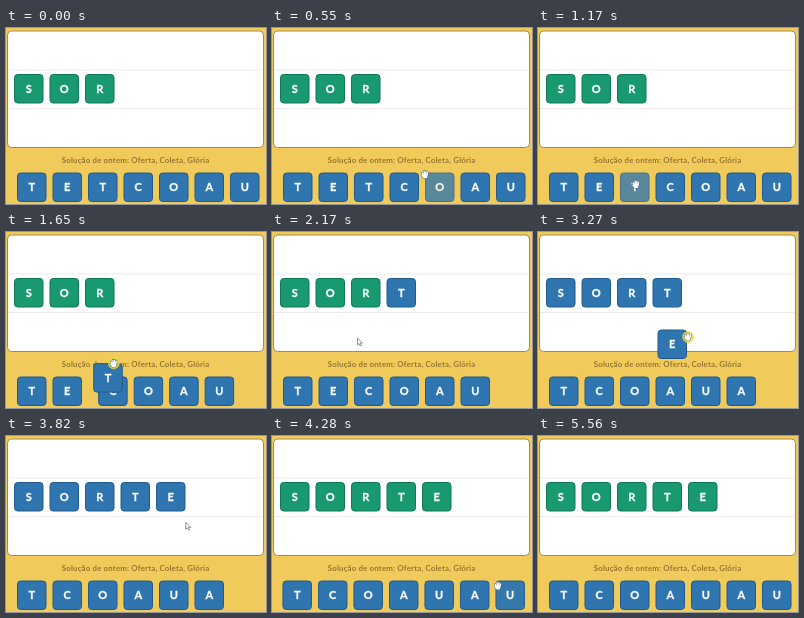
Write an HTML page that moves like this. It is 260 by 176 pixels and loops after 5760 ms.

```html
<!DOCTYPE html>
<html lang="pt">
<head>
<meta charset="utf-8">
<title>Jogo de letras</title>
<style>
  html, body { margin: 0; width: 100%; height: 100%; overflow: hidden; background: #f0cb5c; }
  svg { display: block; width: 100%; height: 100%; }
  text { font-family: Lato, "Open Sans", sans-serif; font-weight: 700; text-anchor: middle; }
  .letter { font-size: 11px; fill: #fff; stroke: #fff; stroke-width: .3; }
  .caption { font-size: 7.8px; letter-spacing: .2px; fill: #96752f; }
</style>
</head>
<body>
<svg id="stage" viewBox="0 0 260 176">
  <rect width="260" height="176" fill="#f0cb5c"/>
  <rect x="1.5" y="3" width="256" height="116.5" rx="4" fill="#fff" stroke="#a48a48"/>
  <path d="M2 42H257M2 80.5H257" stroke="#ececec"/>
  <text class="caption" x="129.6" y="135">Solução de ontem: Oferta, Coleta, Glória</text>
  <g id="tiles"></g>
  <g id="cursor">
    <circle id="press" r="5.5" fill="#f2e136" fill-opacity=".8" stroke="#e3cf2c" stroke-width=".6"/>
    <g id="hand" fill="none" stroke-linecap="round" stroke-linejoin="round">
      <path id="handEdge" stroke="#31506a" stroke-width="2.1"/>
      <path id="handFill" stroke="#fff" stroke-width="1.4"/>
    </g>
    <path id="arrow" d="M0 0V7L1.6 5.5L2.7 8L3.9 7.4L2.8 5.1H5Z" fill="#fff" stroke="#686868" stroke-width=".7" stroke-linejoin="round"/>
  </g>
</svg>
<script>
const LOOP = 5760, PITCH = 35.5, SIZE = 29.5;
const ROW = { x: 8, y: 46 }, RACK = { x: 11, y: 144.5 };
const BLUE = [47, 117, 175], BLUE_EDGE = [33, 91, 141];
const GREEN = [24, 153, 112], GREEN_EDGE = [14, 119, 84];

// Bursts of movement as [start, end, steps]; the picture rests between them.
const bursts = [
  [0, 0, 1], [200, 760, 9], [830, 1170, 6], [1320, 1320, 1], [1500, 2060, 8],
  [2120, 2120, 1], [2170, 2460, 5], [2730, 2730, 1], [3060, 3620, 9],
  [3690, 4200, 8], [4280, 4770, 8], [5560, 5560, 1]
];

// Pointer path as [time, x, y].
const path = [
  [200, 226, 177], [270, 212, 170], [480, 168, 152], [690, 123, 136], [760, 117, 133],
  [830, 115, 135], [960, 105, 147], [1170, 98, 156.5], [1430, 98, 156.5],
  [1660, 113, 118], [1860, 127, 74], [1980, 130, 61], [2060, 123, 68],
  [2120, 104, 88], [2170, 85.5, 106], [2320, 73, 143], [2390, 70, 156], [2460, 69, 161],
  [3000, 69, 161], [3060, 88, 150], [3130, 115, 137], [3200, 142, 114],
  [3270, 150, 105], [3400, 162, 92], [3620, 173, 78], [3690, 174, 79],
  [3980, 197, 108], [4200, 215, 134], [4280, 226, 150], [4490, 231, 165],
  [4600, 234, 175], [4770, 236, 177]
];

const drags = {
  T: { press: 1320, start: 1500, drop: 2020, from: 2, to: 3 },
  E: { press: 2730, start: 3060, drop: 3660, from: 1, to: 4 }
};

const NS = "http://www.w3.org/2000/svg";
const $ = id => document.getElementById(id);
const clamp = v => Math.max(0, Math.min(1, v));
const ramp = (t, a, b) => clamp((t - a) / (b - a));
const ease = v => v * v * (3 - 2 * v);
const mix = (a, b, k) => `rgb(${a.map((v, i) => Math.round(v + (b[i] - v) * k))})`;
const show = (el, on) => el.setAttribute("display", on ? "inline" : "none");
const move = (el, x, y) => el.setAttribute("transform", `translate(${x} ${y})`);

function make(tag, attrs, parent) {
  const el = document.createElementNS(NS, tag);
  for (const key in attrs) el.setAttribute(key, attrs[key]);
  return parent.appendChild(el);
}

function makeTile(letter) {
  const g = make("g", {}, $("tiles"));
  const box = make("rect", { x: .5, y: .5, width: SIZE - 1, height: SIZE - 1, rx: 3.2 }, g);
  make("text", { class: "letter", x: SIZE / 2, y: 18.9 }, g).textContent = letter;
  return { g, box };
}

const word = [..."SOR"].map(makeTile);
const rack = [
  ["T", 0], ["C", 3], ["O", 4], ["A", 5], ["U", 6], ["A", 7, 2300], ["U", 8, 4190]
].map(([letter, slot, born = 0]) => ({ ...makeTile(letter), slot, born }));
const moving = Object.keys(drags).map(letter => ({ ...makeTile(letter), ...drags[letter] }));

const handPath = "M-2.6-1.6L-1.6 1M-.9-3.3L-.6 1M.9-3.3L.7 1M2.6-2L1.9 1.2M-3.1 .7L-1.2 2.8H1.3L1.9 .8H-1.6L-.6 2H.9";
$("handEdge").setAttribute("d", handPath);
$("handFill").setAttribute("d", handPath);

function step(t) {
  const [start, end, n] = bursts.filter(b => b[0] <= t + .01).pop();
  if (n === 1) return start;
  const gap = (end - start) / (n - 1);
  return start + gap * Math.min(n - 1, Math.floor((t - start) / gap + .001));
}

function pointer(t) {
  const i = path.findIndex(p => p[0] > t);
  if (i === 0) return path[0].slice(1);
  if (i < 0) return path[path.length - 1].slice(1);
  const a = path[i - 1], b = path[i], k = ramp(t, a[0], b[0]);
  return [a[1] + (b[1] - a[1]) * k, a[2] + (b[2] - a[2]) * k];
}

// Share of the last moments the pointer spent on a tile.
function hover(t, x, y) {
  let hits = 0;
  for (let i = 0; i < 6; i++) {
    const [px, py] = pointer(t - i * 25);
    if (px >= x && px <= x + SIZE && py >= y && py <= y + SIZE) hits++;
  }
  return hits / 6;
}

function paint(tile, x, y, green, glow) {
  move(tile.g, x, y);
  tile.g.setAttribute("opacity", 1 - .22 * glow);
  tile.box.setAttribute("fill", mix(BLUE, GREEN, green));
  tile.box.setAttribute("stroke", mix(BLUE_EDGE, GREEN_EDGE, green));
}

// A refilled rack slides in from the left.
function slide(t) {
  if (t > 2300 && t < 2460) return -10 * (1 - ramp(t, 2300, 2455)) ** 2;
  if (t > 4190 && t < 4350) return -3.4 * (1 - ramp(t, 4190, 4340)) ** 2;
  return 0;
}

function draw(time) {
  const t = step(time);
  const solved = ramp(t, 3980, 4150);
  const green = t < 3000 ? 1 - ramp(t, 2250, 2400) : solved;
  const dx = slide(t);
  const closed = ease(ramp(t, 1470, 1640)) + ease(ramp(t, 3030, 3200));
  const dragging = moving.some(m => t >= m.start && t < m.drop);

  word.forEach((tile, i) => paint(tile, ROW.x + i * PITCH, ROW.y, green, 0));

  for (const tile of rack) {
    const shift = tile.slot === 0 ? 0
      : tile.born > 4000 ? 2
      : tile.slot === 1 ? 0
      : tile.born > 0 ? 1 + ease(ramp(t, 3030, 3200)) : closed;
    const x = RACK.x + (tile.slot - shift) * PITCH + dx;
    show(tile.g, t >= tile.born);
    paint(tile, x, RACK.y, 0, dragging ? 0 : hover(t, x, RACK.y));
  }

  for (const tile of moving) {
    const homeX = RACK.x + tile.from * PITCH;
    if (t >= tile.drop) {
      paint(tile, ROW.x + tile.to * PITCH, ROW.y, solved, 0);
    } else if (t >= tile.start) {
      const [ax, ay] = pointer(tile.press), [x, y] = pointer(t - 70);
      paint(tile, homeX + x - ax, RACK.y + y - ay, 0, 0);
    } else {
      const x = homeX + dx;
      paint(tile, x, RACK.y, 0, dragging ? 0 : hover(t, x, RACK.y));
    }
  }

  const [x, y] = pointer(t);
  const pressed = moving.some(m => t >= m.press && t < m.drop);
  const hand = pressed || y > 144;
  move($("cursor"), x, y);
  show($("cursor"), t >= 200 && t < 5560);
  show($("press"), pressed);
  show($("hand"), hand);
  show($("arrow"), !hand);
}

const begin = performance.now();
function tick() {
  draw((performance.now() - begin) % LOOP);
  requestAnimationFrame(tick);
}
tick();
</script>
</body>
</html>
```
